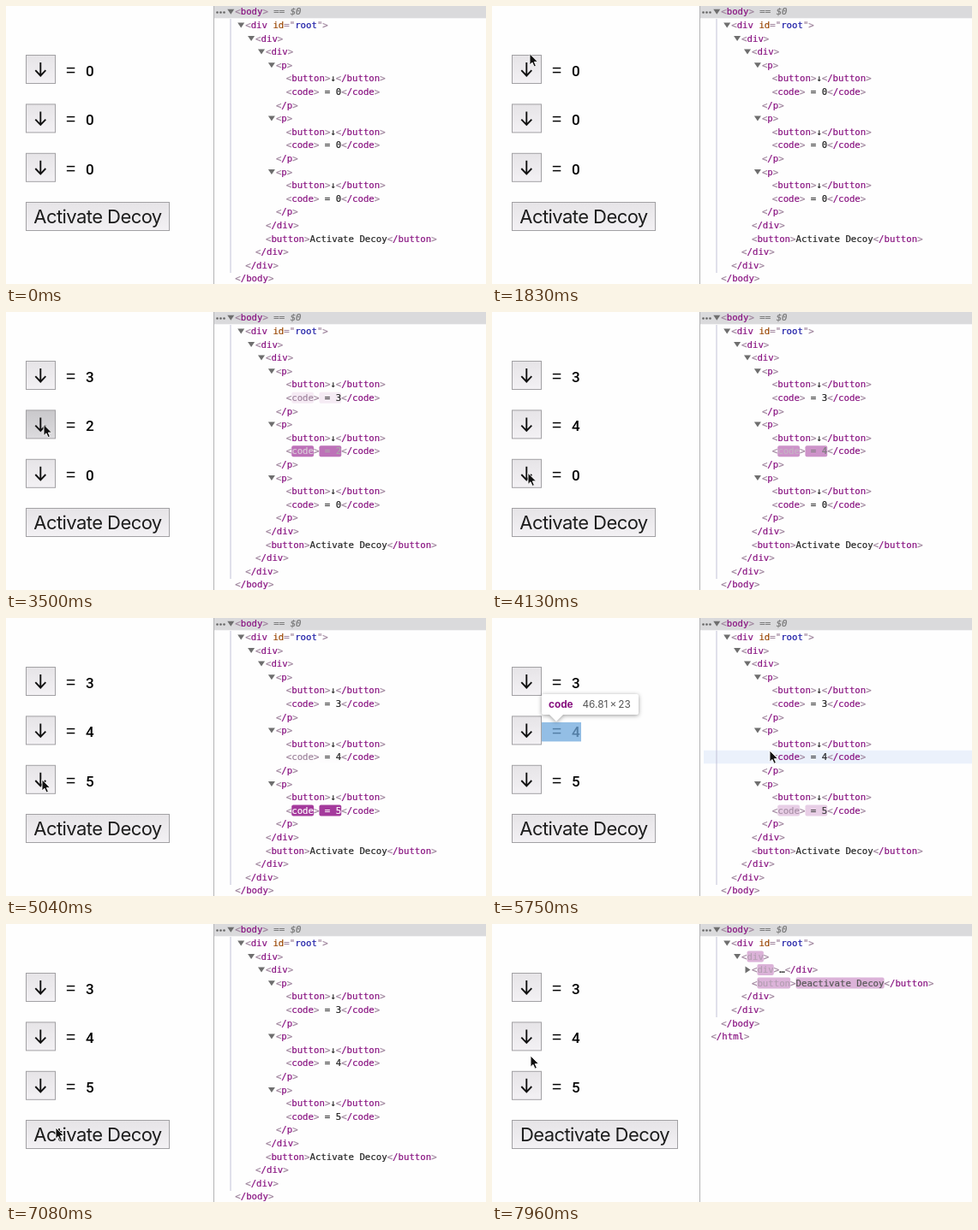
Animation of 560 by 325 pixels, one loop 8 s. Source, as an HTML page:

```html
<!DOCTYPE html>
<html lang="en">
<head>
<meta charset="utf-8">
<title>Decoy counters</title>
<style>
  html, body { margin: 0; width: 100%; height: 100%; overflow: hidden; background: #fefefe; }
  svg { display: block; width: 560px; height: 325px; }
  text { white-space: pre; }
  .node { font: 10.7px "DejaVu Sans Mono", monospace; stroke-width: .2px; }
  .dim { font-style: italic; }
  .count { font: 19.4px "Liberation Mono", monospace; }
  .digit { font: 500 17px Roboto, sans-serif; }
  .label { font: 22px Inter, sans-serif; letter-spacing: -.57px; text-anchor: middle; fill: #1c1c1c; }
  .tip { font: 11.8px Inter, sans-serif; fill: #555; }
  .name { font-weight: 700; fill: #881280; }
  .card { fill: #fff; filter: drop-shadow(0 1px 2.5px rgba(0, 0, 0, .4)); }
</style>
</head>
<body>
<svg viewBox="0 0 560 325">
  <defs>
    <linearGradient id="up" x2="0" y2="1"><stop stop-color="#e6e4e7"/><stop offset="1" stop-color="#f3f1f4"/></linearGradient>
    <linearGradient id="down" x2="0" y2="1"><stop stop-color="#c9c8cb"/><stop offset="1" stop-color="#dcdbde"/></linearGradient>
  </defs>
  <g id="scene"></g>
</svg>
<script>
const LOOP = 8000, ROW = 15.6, CHAR = 6.44, FLASH = 1400, PRESS = 100;
const GREY = [156, 128, 154], TAG = [136, 18, 128], TEXT = [34, 34, 34];
const ATTR = [153, 69, 0], VALUE = [26, 26, 166], DIM = [119, 119, 119];

const series = (first, gap, n) => Array.from({ length: n }, (_, i) => first + i * gap);
const clicks = [series(2000, 270, 3), series(3050, 240, 4), series(4380, 165, 5)];
const toggled = 7430;
const counterTop = i => 57 + 57.4 * i;

// pointer moves: leave time, arrival time, x, y
const moves = [
  [800, 1460, 44, 47],
  [1740, 1980, 44, counterTop(0) + 17],
  [2600, 3005, 44, counterTop(1) + 17],
  [3820, 4150, 42, counterTop(2) + 17],
  [5060, 5350, 270, 216],
  [5350, 5700, 324, 155],
  [5900, 6300, 326, 72],
  [6300, 7050, 58, 238],
  [7470, 7900, 45, 154],
];

function pointer(t) {
  let x = 181, y = 332;
  for (const [leave, arrive, toX, toY] of moves) {
    const u = Math.min(1, Math.max(0, (t - leave) / (arrive - leave)));
    const k = u * u * (3 - 2 * u);
    x += (toX - x) * k;
    y += (toY - y) * k;
  }
  return [x, y];
}

const rect = (x, y, w, h, fill, more = '') =>
  `<rect x="${x}" y="${y}" width="${w}" height="${h}" fill="${fill}" ${more}/>`;
const escape = s => s.replace(/</g, '&lt;').replace(/>/g, '&gt;');
const pressed = (times, t) => times.some(c => t >= c - PRESS && t < c);

// 0 right after a change, 1 once the highlight is gone
const settle = (t, since) => t < since ? 1 : 1 - Math.max(0, 1 - (t - since) / FLASH) ** 2;

const open = (name, p = 1) => [['<', GREY], [name, p < 1 ? GREY : TAG, p], ['>', GREY]];
const shut = name => [['<', GREY], ['/' + name, TAG], ['>', GREY]];
const wrap = (name, body, p, bodyP = p) => [...open(name, p), [body, TEXT, bodyP], ...shut(name)];

function treeRows(t, counts) {
  const p = settle(t, toggled);
  const rows = [
    [0, [...open('body'), [' == ', DIM], ['$0', DIM, 1, 'dim']], 'v'],
    [1, [['<', GREY], ['div ', TAG], ['id', ATTR], ['="', GREY], ['root', VALUE], ['">', GREY]], 'v'],
    [2, open('div', p), 'v'],
  ];
  if (t < toggled) {
    rows.push([3, open('div'), 'v']);
    clicks.forEach((times, i) => {
      const last = times[counts[i] - 1] ?? LOOP;
      rows.push(
        [4, open('p'), 'v'],
        [5, wrap('button', '↓')],
        [5, wrap('code', ' = ' + counts[i], settle(t, last))],
        [4, shut('p')]);
    });
    rows.push([3, shut('div')], [3, wrap('button', 'Activate Decoy')]);
  } else {
    rows.push([3, wrap('div', '…', p, 1), '>'], [3, wrap('button', 'Deactivate Decoy', p)]);
  }
  return rows.concat([[2, shut('div')], [1, shut('div')], [0, shut('body')], [-1, shut('html')]]);
}

function drawRow([depth, parts, arrow], i) {
  const y = 6.5 + ROW * i;
  let x = 267.3 + 11.9 * depth, out = '';
  if (arrow) {
    const shape = arrow === 'v' ? 'M-4-3H4L0 3z' : 'M-2.5-4V4L3.5 0z';
    out += `<path d="${shape}" transform="translate(${x - 5} ${y + .3})" fill="#6e6e6e"/>`;
  }
  for (const [s, rgb, p = 1, style = ''] of parts) {
    const w = s.length * CHAR, ink = 1 - (1 - p) ** 1.5;
    if (p < 1) out += rect(x, y - 6.3, w, 13, `rgba(164,58,156,${1 - p})`, 'rx="2"');
    const color = `rgb(${rgb.map(c => Math.round(255 + (c - 255) * ink))})`;
    out += `<text class="node ${style}" x="${x}" y="${y + 3.8}" fill="${color}" stroke="${color}">${escape(s)}</text>`;
    x += w;
  }
  return out;
}

const button = (y, w, down) =>
  rect(23.5, y + .5, w - 1, 33, `url(#${down ? 'down' : 'up'})`, 'stroke="#a2a1a4"');

function drawCounter(i, count, down) {
  const y = counterTop(i);
  return button(y, 35, down) +
    `<path d="M40.3 ${y + 9}v15.5m-6-6.3l6 6.3l6-6.3" fill="none" stroke="#111" stroke-width="1.9"/>` +
    `<text class="count" x="58" y="${y + 25}"> = <tspan class="digit">${count}</tspan></text>`;
}

function drawInspect(row) {
  const top = counterTop(Math.floor((row - 4) / 4));
  const paragraph = ['p', '196 × 34', 23, top, 196, 34, 23];
  const [name, size, x, y, w, h, margin] = [
    paragraph,
    ['button', '35 × 34', 23, top, 35, 34, 0],
    ['code', '46.81 × 23', 58, top + 7.5, 46, 22.5, 0],
    paragraph,
  ][row % 4];
  const tipY = Math.max(1, y - margin - 33), nameW = name.length * 7.5;
  let out = rect(x, y, w, h, 'rgba(111,168,220,.75)');
  for (const my of [y - margin, y + h]) out += rect(x, my, w, margin, 'rgba(246,178,107,.66)');
  return out +
    `<path class="card" d="M${x + 2} ${tipY}h${nameW + size.length * 5.7 + 22}q2 0 2 2v20q0 2-2 2H${x + 25}l-8 8l-8-8h-7q-2 0-2-2v-20q0-2 2-2z"/>` +
    `<text class="tip name" x="${x + 8}" y="${tipY + 16.5}">${name}</text>` +
    `<text class="tip" x="${x + 17.5 + nameW}" y="${tipY + 16.5}">${size.replace(/ /g, '\u2009')}</text>`;
}

function draw(t) {
  const counts = clicks.map(times => times.filter(c => c <= t).length);
  const [px, py] = pointer(t);
  const closed = t >= toggled, row = Math.floor((py + 1.3) / ROW);
  const hover = !closed && px > 247 && row > 3 && row < 16;
  const width = closed ? 194 : 168;

  let out = rect(242, 0, 1, 325, '#b4b4b6') + rect(243, 0, 317, 14.3, '#dadadc');
  if (hover) out += rect(247, row * ROW - 1.3, 313, ROW, '#ebf1fb');
  out += rect(261.5, 15, 1, closed ? 94 : 297, '#c2c2d8');
  for (const x of [246.5, 250.5, 254.5]) out += `<circle cx="${x}" cy="7.5" r="1.3" fill="#666"/>`;
  out += treeRows(t, counts).map(drawRow).join('');
  out += counts.map((n, i) => drawCounter(i, n, pressed(clicks[i], t))).join('');
  out += button(229, width, pressed([toggled], t)) +
    `<text class="label" x="${23 + width / 2}" y="254">${closed ? 'Deactivate' : 'Activate'} Decoy</text>`;
  if (hover) out += drawInspect(row);
  out += `<path d="M0 0V13.2l3-2.8 2.1 4.8 2.3-1-2.1-4.6h4.2z" transform="translate(${px} ${py})" fill="#111" stroke="#fff" stroke-width=".9"/>`;
  scene.innerHTML = out;
}

const scene = document.getElementById('scene');
const start = performance.now();
function frame() {
  draw((performance.now() - start) % LOOP);
  requestAnimationFrame(frame);
}
frame();
</script>
</body>
</html>
```
